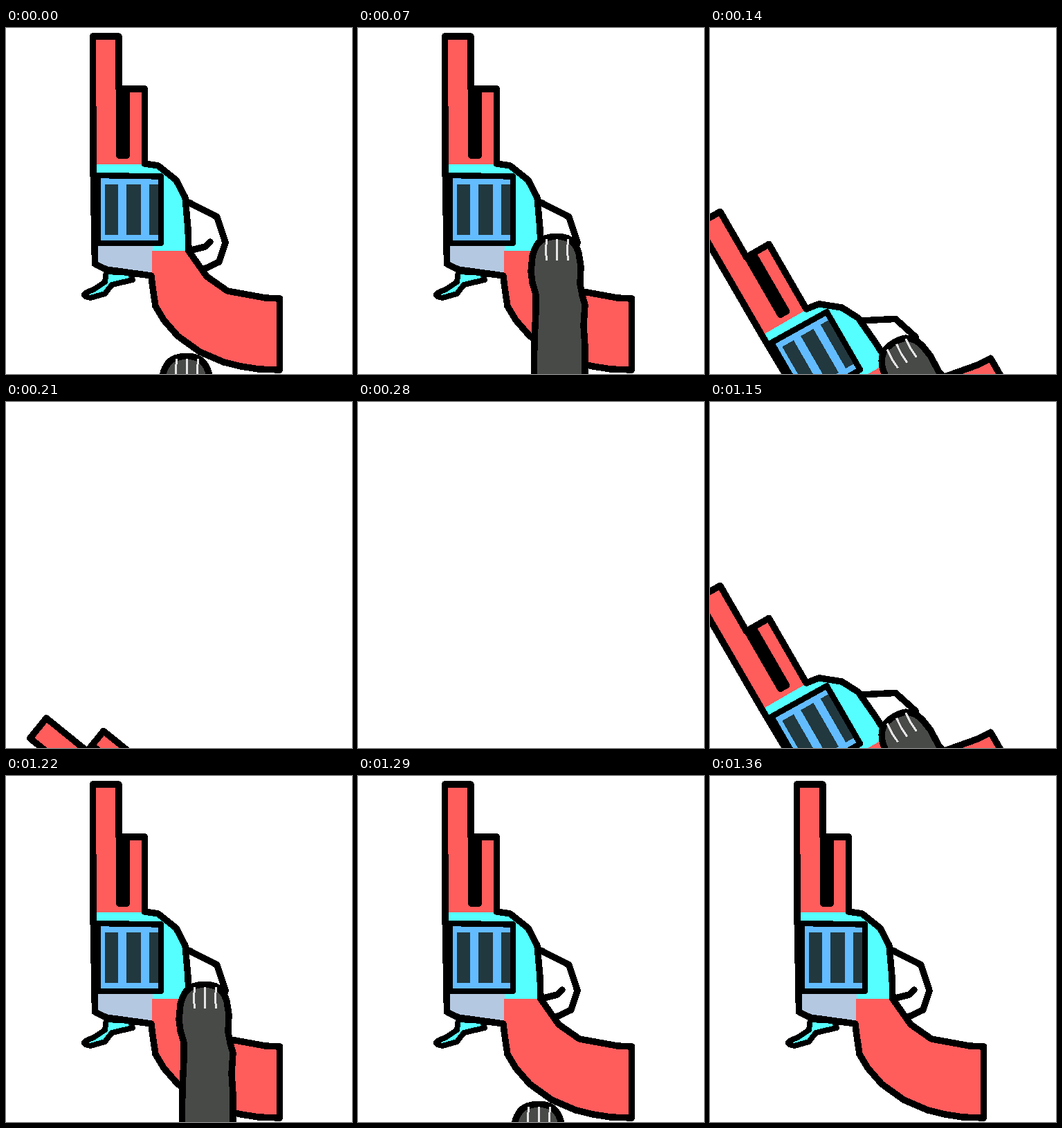
An HTML page for the animation above (1.43 s loop, 500 by 500 pixels).

```html
<!DOCTYPE html>
<html lang="en">
<head>
<meta charset="utf-8">
<title>Revolver draw</title>
<style>
  html, body { margin: 0; height: 100%; overflow: hidden; background: #fff; }
  svg { display: block; width: 100%; height: 100%; }
  .line { fill: none; stroke: #000; stroke-width: 9.5; stroke-linejoin: round; stroke-linecap: round; }
</style>
</head>
<body>
<svg viewBox="0 0 500 500" shape-rendering="crispEdges">
  <g id="scene">
    <!-- frame, barrels and grip -->
    <path fill="#56ffff" d="M126 196H200L220 199 245 220 260 245 263 290 264 324H126Z"/>
    <path fill="#ff5c5c" d="M126 12H163V88H200V197H126Z"/>
    <path fill="#b4c8e1" d="M128 312H212V358L145 349 128 341Z"/>
    <path fill="#ff5c5c" d="M211 322H264L290 358 320 380 375 390 395 391V494L365 493 315 483 280 468 248 445 228 422 216 402 211 367Z"/>

    <!-- trigger guard, trigger and hammer -->
    <path class="line" d="M264 252 305 273 317 310 308 338 287 348M264 322 288 316 295 309"/>
    <path class="line" style="fill:#56ffff;stroke-width:8" d="M145 352 143 367 128 377 117 382Q107 387 122 390L143 384 153 371 183 364 180 354Z"/>

    <path class="line" d="M125.5 12H163V88H200.5V196L220 199 246 220 259 245 263 290 264 322 290 359 320 380 375 390 395.5 391V494L365 493 340 489 315 483 280 468 248 445 228 422 216 402 211 368 210 358 145 349 128.5 341 126 200Z"/>
    <path class="line" d="M164 88V184.5H174V88Z" style="fill:#000"/>

    <!-- cylinder -->
    <path class="line" style="fill:#62bcff;stroke-width:8.5" d="M132.5 213 224 214.5V311H132.5Z"/>
    <path fill="#22383f" d="M143 226H162V299H143ZM174 226H195V299H174ZM207 226H220V299H207Z"/>

    <g id="thumb">
      <path class="line" style="fill:#484a48" d="M254 520 255 450 257 410 257 385 252 368 250 352 252 330Q257 308 272 303.5Q287 299 302 303.5Q314 309 319 325L322 345 321 370 324 386 328 400 326 430 328 460V520"/>
      <path fill="none" stroke="#e4e4e4" stroke-width="3" d="M272.5 305l-1 16 1 15M288 305l-1 16 1 15M303.5 305l-1 16 1 15"/>
    </g>
  </g>
</svg>
<script>
const scene = document.getElementById("scene"), thumb = document.getElementById("thumb");
const STEP = 70, LOOP = 1430, HIDDEN_FROM = 280, HIDDEN_TO = 1080;

const move = (x, y, turn = 0) => `translate(${x} ${y}) rotate(${turn} 250 250)`;

// Poses from fully drawn to almost out of view
const poses = [
  { scene: move(0, 0) },
  { scene: move(0, 0), thumb: move(-26, 173) },
  { scene: move(0, 0), thumb: move(0, 0) },
  { scene: move(-41, 178, -30), thumb: move(0, 0) },
  { scene: move(48, 289, -51), thumb: move(0, 0) }
];

function poseAt(time) {
  if (time < HIDDEN_FROM) return poses[1 + Math.floor(time / STEP)];
  if (time < HIDDEN_TO) return null;
  return poses[4 - Math.floor((time - HIDDEN_TO) / STEP)];
}

function draw(now) {
  const pose = poseAt(now % LOOP);
  scene.setAttribute("display", pose ? "inline" : "none");
  if (!pose) return;
  scene.setAttribute("transform", pose.scene);
  thumb.setAttribute("display", pose.thumb ? "inline" : "none");
  if (pose.thumb) thumb.setAttribute("transform", pose.thumb);
}

const start = performance.now();
function tick() {
  draw(performance.now() - start);
  requestAnimationFrame(tick);
}
tick();
</script>
</body>
</html>
```
